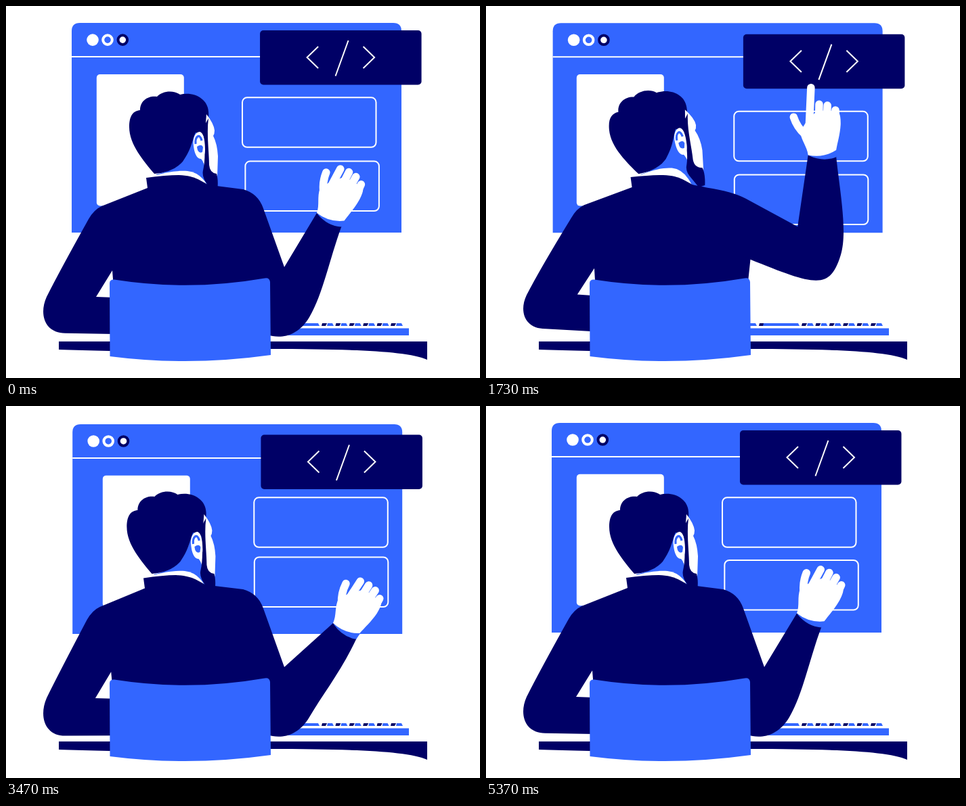
Recreate the animation shown at these times as an HTML page. Size 700 px wide and 550 px high, loop 5.41 s.

```html
<!DOCTYPE html>
<html lang="en">
<head>
<meta charset="utf-8">
<title>Developer at work</title>
<style>
  html, body { margin: 0; width: 100%; height: 100%; overflow: hidden; background: #fff; }
  svg { display: block; width: 100vw; height: 100vh; }
  .blue { fill: #36f; }
  .navy { fill: #006; }
  .white { fill: #fff; }
  .line { fill: none; stroke: #fff; stroke-width: 2; }
  .finger { fill: none; stroke: #fff; stroke-width: 11.5; stroke-linecap: round; }
</style>
</head>
<body>
<svg viewBox="0 0 700 550">
  <g id="window">
    <path class="blue" d="M97 335V37Q97 25 109 25H572Q584 25 584 37V335Z"/>
    <path class="line" d="M97 75H584"/>
    <circle class="white" cx="128" cy="50" r="8.8"/>
    <circle cx="150" cy="50" r="6.8" fill="#36f" stroke="#fff" stroke-width="4"/>
    <circle cx="172.3" cy="50" r="6.8" fill="#fff" stroke="#006" stroke-width="4"/>
  </g>
  <rect id="page" class="white" width="129" height="194.5" rx="5"/>
  <rect id="boxA" class="line" width="197.5" height="73.5" rx="7"/>
  <rect id="boxB" class="line" width="197.5" height="73.5" rx="7"/>
  <g id="panel">
    <rect class="navy" width="238.500" height="80.5" rx="5"/>
    <path id="less" class="line" d="M86 24L69.5 40L86 56"/>
    <path id="slash" class="line" d="M130.5 15L111.5 67.5"/>
    <path id="more" class="line" d="M152.5 24L169 40L152.5 56"/>
  </g>

  <path class="navy" d="M78 496H622V523C592 509 500 507.5 391 507L153 510Q110 509 78 508Z"/>
  <g id="keys">
    <path class="blue" d="M380 476.5H595V487H380ZM385 469H398L400 473H385ZM409 469H461L463 473H409Z"/>
    <path class="navy" d="M404 469H410L409 473H403Z"/>
  </g>

  <g id="head">
    <path class="blue" d="M222 249C250 243 270 225 276 196L295 212L291 245L302 274H225Z"/>
    <path class="white" d="M284 222Q291 227 293.5 238L296 200Z"/>
    <path class="navy" d="M219 248C204 230 182 205 182 179C182 162 188 155 198 154C198 140 210 132 223 134C231 125 248 124 257 131C277 126 298 137 299 156Q300 166 296 173L292 192L280 187C275 197 275 210 261 230Q247 246 219 248Z"/>
    <g id="face">
      <path class="white" d="M296 160Q307 174 308 184Q308 189 306 192Q312 204 313 222L312 252L296 250L293 200Z"/>
      <path class="navy" d="M290 182C294 200 295 226 291 243Q289 252 296 262L304 276L312 274Q314 258 311 248Q301 247 300 235C300 215 296 190 299 166Z"/>
    </g>
    <path class="white" d="M277 207C275 195 280 186 286 186C292 187 294 200 294 212C294 220 291 226 287 226C281 225 278 216 277 207Z"/>
    <path fill="none" stroke="#36f" stroke-width="3.2" d="M280 204C279 193 286 187 289 199"/>
    <path class="blue" d="M282 208Q289 203 291 209L290 216Q283 219 282 208Z"/>
  </g>
  <path id="collar" class="white"/>
  <path id="torso" class="navy"/>
  <path id="arm" class="navy"/>

  <g id="hand">
    <path class="blue" d="M1 1Q22 13 41 7L43 -5Z"/>
    <path class="white" d="M0 0C0 -13 -8 -22 -8 -36L3 -50L20 -64L36 -62L52 -57Q54 -52 52.5 -40C50 -25 45 -14 42 -3Q22 7 0 0Z"/>
    <path id="thumb" class="finger" d="M-1 -32Q-8 -45 -7.500 -61"/>
    <path id="index" class="finger"/>
    <path class="finger" d="M20 -40L24 -73M31 -38L36 -70M45 -38L47 -62"/>
  </g>

  <path class="blue" d="M153 410Q153 404 160 404.5Q270 422 382 402.5Q389 401 390 408L391 516Q270 533 153.5 518Z"/>
</svg>
<script>
const PERIOD = 5410;
const SLIDE_TIME = 800;

// x, y: left side of the wrist; turn: hand angle; raise: arm from desk (0) to panel (1).
const POSES = [
  { at: 0,    x: 459, y: 306, turn: 20, raise: 0,    lean: 0 },
  { at: 1200, x: 468, y: 257, turn: 0,  raise: 0.5,  lean: 2 },
  { at: 2270, x: 481, y: 196, turn: -9, raise: 1,    lean: 10.5 },
  { at: 2700, x: 480, y: 260, turn: 8,  raise: 0.52, lean: -1 },
  { at: 3470, x: 483, y: 321, turn: 25, raise: 0,    lean: -4 },
  { at: 4500, x: 471, y: 314, turn: 26, raise: 0,    lean: 2 }
];

const el = id => document.getElementById(id);
const set = (id, name, value) => el(id).setAttribute(name, value);
const move = (id, x, y, turn = '') => set(id, 'transform', `translate(${x} ${y}) ${turn}`);

function ease(u) {
  u = Math.min(1, Math.max(0, u));
  return u * u * (3 - 2 * u);
}

// Slides from 0 to 1 around `on` and back around `off`.
function hold(t, on, off) {
  const since = (t - on + SLIDE_TIME / 2 + PERIOD) % PERIOD;
  return ease(since / SLIDE_TIME) - ease((since - off + on) / SLIDE_TIME);
}

// Periodic monotone cubic interpolation of one pose property.
function sample(name, t) {
  const n = POSES.length;
  const pose = i => POSES[(i + n) % n];
  const time = i => pose(i).at + PERIOD * Math.floor(i / n);
  const value = i => pose(i)[name];
  const slope = i => (value(i + 1) - value(i)) / (time(i + 1) - time(i));
  const tangent = i => {
    const a = slope(i - 1), b = slope(i);
    return a * b > 0 ? 2 * a * b / (a + b) : 0;
  };
  let i = n - 1;
  while (time(i) > t) i--;
  const span = time(i + 1) - time(i);
  const u = (t - time(i)) / span, v = 1 - u;
  return v * v * (1 + 2 * u) * value(i) + u * u * (3 - 2 * u) * value(i + 1)
    + span * u * v * (v * tangent(i) - u * tangent(i + 1));
}

function drawKeys() {
  let caps = '', sides = '';
  for (let i = 0; i < 6; i++) {
    const x = 467 + i * 20.4;
    sides += `M${x} 469h7l-2 4h-6z`;
    caps += `M${x + 8} 469h7l2 4h-10z`;
  }
  el('keys').insertAdjacentHTML('beforeend',
    `<path class="navy" d="${sides}"/><path class="blue" d="${caps}"/>`);
}

function drawScreen(t) {
  const phase = 2 * Math.PI * t / PERIOD;
  const driftX = 1 - Math.cos(2 * phase);
  const driftY = 0.75 + 1.25 * Math.cos(2 * phase - 2.1);
  move('window', driftX, driftY);
  move('page', 133.8 + 9 * hold(t, 2600, 4950), 100.8 + driftY);
  move('boxA', 349 + 17.3 * hold(t, 600, 4000), 135.3 + 20.5 * hold(t, 600, 2270));
  move('boxB', 349.3 + 17.5 * hold(t, 150, 4000), 223.5 + 26 * hold(t, 150, 2500));

  move('panel', 377 + 3 * Math.sin(phase - 0.7), 40 - 4 * Math.cos(phase));
  const press = Math.exp(-(((t - 2240) / 200) ** 2));
  move('less', -3 * press, 0);
  move('more', 2 * press, 0);
  set('slash', 'transform', `rotate(${-6 * press} 121 41)`);
}

function drawBody({ lean: b, raise }) {
  const look = Math.sin(Math.PI * Math.min(0.5, raise));
  const lift = b * 0.7, rise = 4.4 * look;
  const elbow = 484 - 1.4 * lift;
  move('head', b * 0.9, -2.6 * look, `rotate(${-5.5 * look} 250 245)`);
  set('face', 'transform', `translate(294 0) scale(${1 + 0.2 * raise} 1) translate(-294 0)`);
  set('collar', 'd', `M${218 + b} 251C${236 + b} ${246 - rise / 2} ${252 + b} ${243 - rise}
    ${268 + b} ${244 - rise}Q${287 + b} ${246 - rise} ${298 + b} 266L${255 + b} 270L${212 + b} 262Z`);
  set('torso', 'd', `M${207 + b} ${254 - lift * 0.2}Q${236 + b} 250 ${255 + b} 250
    C${280 + b} 251 ${286 + b} 258 ${298 + b} 264Q${306 + b} 266 ${311 + b * 0.7} 266
    L${350 - 30 * raise} ${271 - 3 * raise}L365 300L391 370L386 417H${159 + b * 0.4}
    L${157 + b * 0.45} ${391 - lift * 0.7}L${133 + lift * 0.4} ${430 - lift * 0.75}
    L160 ${431 - lift * 0.6}V${485 - lift * 0.8}L88 ${elbow - 0.3}
    C58 ${elbow} 48 ${457 - lift} 60 ${430 - lift * 0.6}
    Q${78 + b * 0.2} ${394 - lift} ${122 + b * 0.6} ${315 - lift * 0.4}
    Q${130 + b * 0.6} ${301 - lift * 0.4} ${141 + b * 0.6} ${296 - lift * 0.4}
    L${209 + b} ${269 - lift * 0.2}Z`);
}

function drawArm({ x, y, turn, raise: r }) {
  const add = (p, dx, dy) => [p[0] + dx, p[1] + dy];
  const angle = turn * Math.PI / 180, cos = Math.cos(angle), sin = Math.sin(angle);
  const bend = r * (1 - r), high = r ** 3;

  const wrist = [x, y];
  const wristOuter = add(wrist, 41 * cos - 6 * sin, 41 * sin + 6 * cos);
  const shoulder = [350 - 30 * r, 271 - 3 * r];
  const corner = [372 - 48 * bend, 277 - 16 * bend];
  const inner = [411 + 61 * r, 386 - 74 * r];
  const upper = corner.map((c, i) => c + 0.2 * (inner[i] - c));
  const outer = add(inner, 37 + 33 * r, 74 - 61 * high);
  const armpit = [386 + 6 * high, 486 - 116 * r * (2 - r)];

  // Tangent of the outline where it passes the outer elbow.
  const tx = 20 - 18 * high, ty = -34, pull = 0.9 + 1.2 * high;
  set('arm', 'd', `M300 330L${shoulder}Q${corner} ${upper}L${inner}L${wrist}L${wristOuter}
    C${add(wristOuter, -52 * sin, 52 * cos)} ${add(outer, tx, ty)} ${outer}
    C${add(outer, -tx * pull, -ty * pull)} ${add(armpit, 17 + 101 * r, 6 + 17 * r + 130 * bend)} ${armpit}Z`);
}

function drawHand({ x, y, turn, raise }) {
  const reach = 32 * raise - 13;
  move('hand', x, y, `rotate(${turn})`);
  set('thumb', 'transform', `rotate(${-22 * raise * raise} 0 -28)`);
  set('index', 'd', `M6 -42L${12.5 + reach * 0.16} ${-86 - reach}`);
}

function render(t) {
  const pose = {};
  for (const name in POSES[0]) pose[name] = sample(name, t);
  drawScreen(t);
  drawBody(pose);
  drawArm(pose);
  drawHand(pose);
}

drawKeys();
const start = performance.now();
function tick() {
  render((performance.now() - start) % PERIOD);
  requestAnimationFrame(tick);
}
tick();
</script>
</body>
</html>
```
